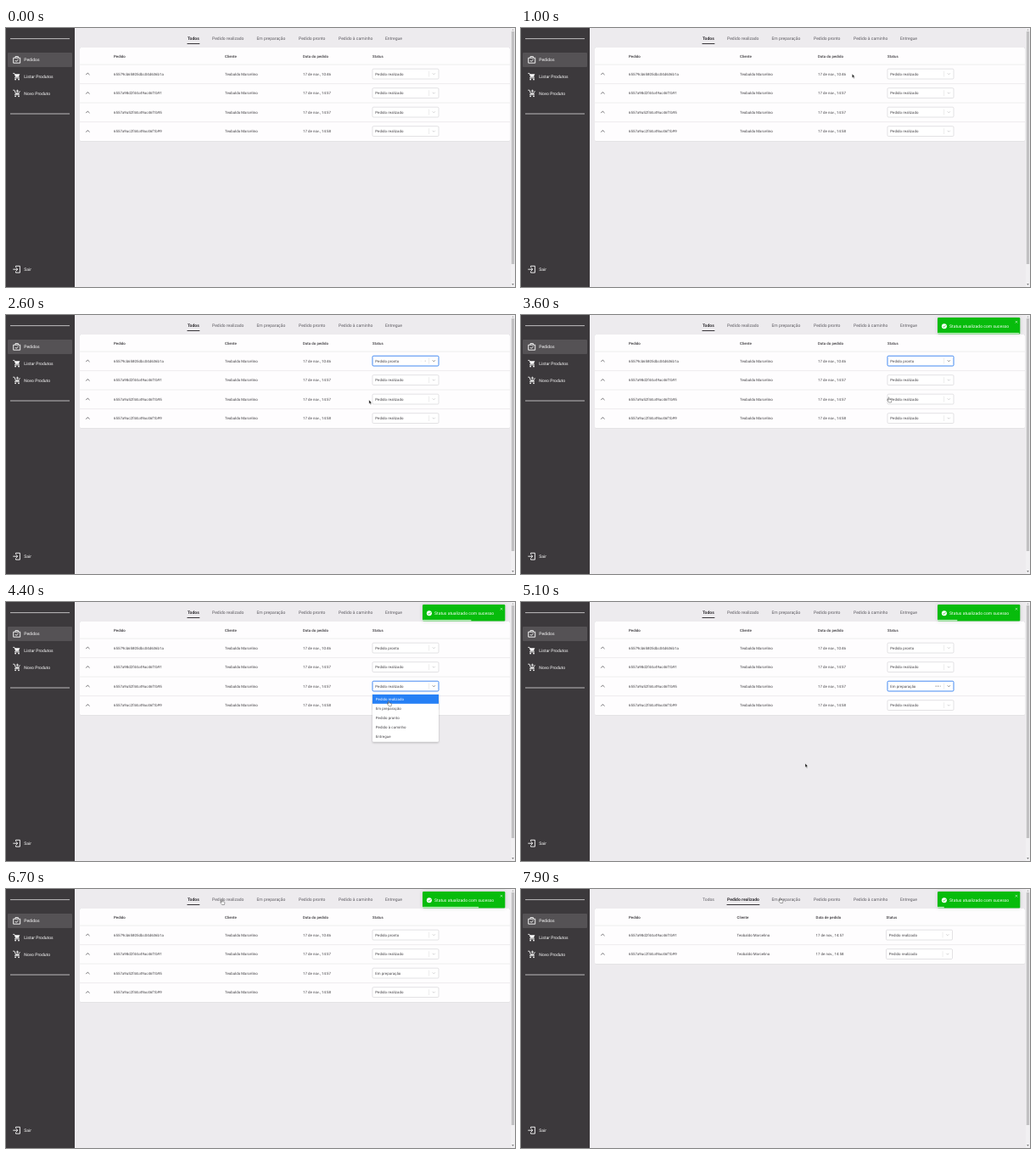
Write an HTML page that moves like this. It is 600x305 px and loops after 8 s.

```html
<!DOCTYPE html>
<html lang="pt">
<head>
<meta charset="utf-8">
<title>Pedidos</title>
<style>
html, body { margin: 0; width: 100%; height: 100%; overflow: hidden; background: #edebee; }
svg { display: block; width: 600px; height: 305px; font-family: Roboto, Arial, sans-serif; text-rendering: geometricPrecision; }
.card { filter: drop-shadow(0 .6px .6px rgba(0,0,0,.3)); }
.menu { filter: drop-shadow(0 1px 1.2px rgba(0,0,0,.25)); }
.toast { filter: drop-shadow(0 .5px 2px rgba(0,0,0,.15)); }
</style>
</head>
<body>
<svg viewBox="0 0 600 305">
  <rect width="600" height="305" fill="#edebee"/>
  <rect width="81" height="305" fill="#3c393c"/>
  <path d="M5 12.6H75M5 101H75" stroke="#f4f3f4" stroke-width=".7"/>
  <rect x="2" y="29" width="76" height="17" rx="1" fill="#555255"/>
  <g fill="none" stroke="#fff" stroke-width=".9" stroke-linejoin="round">
    <path d="M8.7 35.2H16.7V41.2H8.7ZM11 35V33.6H14.4V35M10.9 38.1L12.2 39.4L14.7 36.8"/>
    <path d="M11.5 281.8V280.3H16.4V288.1H11.5V286.6M8.3 284.2H13.6M11.9 282.3L13.8 284.2L11.9 286.1"/>
  </g>
  <g id="carts"></g>
  <g id="labels"></g>
  <rect x="595" width="5" height="305" fill="#f1f0f2"/>
  <rect x="595.8" y="4" width="3.4" height="274" fill="#c1c0c2"/>
  <path d="M596.2 301.2H598.8L597.5 302.7Z" fill="#555"/>
  <path d="M596.2 2.8H598.8L597.5 1.3Z" fill="#aaa"/>
  <g id="live"></g>
</svg>
<script>
const LOOP = 8000;
const STATUS = ["Pedido realizado", "Em preparação", "Pedido pronto", "Pedido à caminho", "Entregue"];
const TABS = [["Todos", 214, 228], ["Pedido realizado", 243, 281], ["Em preparação", 295.5, 329.5],
  ["Pedido pronto", 345, 377], ["Pedido à caminho", 392, 432], ["Entregue", 447, 467]];
const ORDERS = [
  ["65579cb65805dbc04d636b1a", "10:46"],
  ["6557a98d2f44c49ac46f1b91", "14:57"],
  ["6557a9a52f44c49ac46f1b95", "14:57"],
  ["6557a9ac2f44c49ac46f1b99", "14:58"]
];
const CLIENT = "Teobaldo Marcelino";

// time, x, y of the pointer tip
const PATH = [[100, 26, 232], [400, 150, 130], [600, 262, 13], [900, 358, 53], [1000, 390, 54],
  [1200, 452, 56], [1400, 452, 56], [1700, 452, 67], [2100, 451, 89], [2300, 451, 89],
  [2600, 428, 100], [2900, 392, 99], [3100, 392, 100], [3450, 433, 97], [3800, 433, 97],
  [4000, 440, 98], [4300, 450, 113], [4600, 452, 124], [4800, 452, 124], [4900, 410, 150],
  [5100, 335, 190], [5500, 318, 200], [5700, 312, 202], [5850, 288, 145], [6000, 239, 48.5],
  [6200, 217, 22], [6500, 254, 12.5], [7500, 254, 12.5], [7700, 268, 46], [7900, 305, 10.5], [8000, 305, 10.5]];

const OPEN = [[0, 1400, 2300], [2, 4000, 4800]];
const LOADING = [[0, 2300, 3000], [2, 4800, 5350]];
const TAB_AT = 6900, BLUR_AT = 6650;

const inside = (t, a, b) => t >= a && t < b;
const clamp = v => Math.max(0, Math.min(1, v));
const mix = (a, b, k) => a + (b - a) * k;
const easeOut = k => 1 - (1 - k) ** 3;

function text(str, x, mid, size = 4.375, fill = "#454347", weight = 400, space = .02) {
  return `<text x="${x}" y="${mid + size * .36}" font-size="${size}" font-weight="${weight}" fill="${fill}" letter-spacing="${space}">${str}</text>`;
}
function rect(x, y, w, h, fill, extra = "") {
  return `<rect x="${x}" y="${y}" width="${w}" height="${h}" fill="${fill}" ${extra}/>`;
}
function line(d, color, width = .5) {
  return `<path d="${d}" fill="none" stroke="${color}" stroke-width="${width}"/>`;
}

function cart(y, plus) {
  return `<g transform="translate(8 ${y})">` +
    line("M.3 .8H1.9L3.7 5.2H7.6", "#fff", .9) +
    (plus ? line("M5.4 .2V3.4M3.8 1.8H7M4 4.4H7L8.4 1.8", "#fff", .8) : `<path d="M2.3 1.6H8.4L6.9 4.7H3.6Z" fill="#fff"/>`) +
    line("M3.3 4.8L2.5 6.3H7.8", "#fff", .8) +
    `<circle cx="3.1" cy="7.9" r=".9" fill="#fff"/><circle cx="7" cy="7.9" r=".9" fill="#fff"/></g>`;
}

function tabs(active) {
  return TABS.map(([name, x, end], i) => i === active
    ? text(name, x, 12.5, 5, "#2f2d31", 700) + rect(x - .5, 18, end - x + .8, 1, "#39363a")
    : text(name, x, 12.5, 5, "#5c5a60")).join("");
}

function select(x, mid, value, focus, dots, t) {
  const ink = focus ? "#666" : "#c4c4c6";
  let out = rect(x, mid - 5.9, 78, 11.8, "#fff",
    `rx="1.2" stroke="${focus ? "#2f7df0" : "#c6c5c9"}" stroke-width="${focus ? .9 : .5}"`);
  out += text(STATUS[value], x + 3.3, mid, 4.375, "#454347", 400, .06);
  out += line(`M${x + 66.6} ${mid - 3.4}V${mid + 3.4}`, "#ccc", .35);
  out += line(`M${x + 70.8} ${mid - .8}L${x + 72.3} ${mid + .7}L${x + 73.8} ${mid - .8}`, ink, .75);
  if (dots) {
    for (let i = 0; i < 3; i++) {
      const a = .5 + .5 * Math.cos((t - i * 160) / 1000 * 2 * Math.PI);
      out += `<circle cx="${x + 57.2 + i * 2.5}" cy="${mid}" r=".65" fill="#666" opacity="${a}"/>`;
    }
  }
  return out;
}

function menu(x, mid, value, pointY) {
  const top = mid + 8.5, step = 10.94;
  let out = `<g class="menu">${rect(x, top, 78, 57.2, "#fff", 'rx="1.2"')}</g>`;
  const hover = Math.floor((pointY - top - 1.25) / step);
  STATUS.forEach((name, i) => {
    const y = top + 1.25 + i * step;
    if (i === value) out += rect(x, y, 78, step, "#2680f5");
    else if (i === hover) out += rect(x, y, 78, step, "#deebff");
    out += text(name, x + 3.8, y + step / 2, 4.375, i === value ? "#fff" : "#454347", 400, .06);
  });
  return out;
}

function table(t, pointY) {
  const filtered = t >= TAB_AT;
  const cols = filtered ? [127, 254.5, 347.5, 430.5] : [127, 258, 350, 432];
  const values = [t < 2300 ? 0 : 2, 0, t < 4800 ? 0 : 1, 0];
  const rows = filtered ? [1, 3] : [0, 1, 2, 3];
  const focus = t < 1300 || t >= BLUR_AT ? -1 : t < 4000 ? 0 : 2;
  let out = `<g class="card">${rect(87, 23, 507, 20.2 + rows.length * 22.5, "#fefdfe", 'rx="1.2"')}</g>`;
  ["Pedido", "Cliente", filtered ? "Data de pedido" : "Data do pedido", "Status"].forEach((h, i) => {
    out += text(h, cols[i], 33.7, 4.375, "#39373b", 500, .04);
  });
  rows.forEach((r, i) => {
    const mid = 54.1 + i * 22.5, [id, hour] = ORDERS[r];
    out += line(`M87 ${mid - 11}H594`, "#dcdadd", .5);
    out += line(`M94.3 ${mid + 1}L96.4 ${mid - 1.1}L98.5 ${mid + 1}`, "#454347", .75);
    out += text(id, cols[0], mid) + text(CLIENT, cols[1], mid) + text("17 de nov., " + hour, cols[2], mid);
    const busy = LOADING.some(([n, a, b]) => n === r && inside(t, a, b));
    out += select(cols[3], mid, values[r], focus === r, busy, t);
  });
  OPEN.forEach(([r, a, b]) => {
    if (inside(t, a, b)) out += menu(cols[3], 54.1 + r * 22.5, values[r], pointY);
  });
  return out;
}

// Bouncing entry from the right edge
function enter(k) {
  const stops = [[0, 940], [.6, -7.8], [.75, 3.1], [.9, -1.6], [1, 0]];
  for (let i = 1; i < stops.length; i++) {
    const [a, from] = stops[i - 1], [b, to] = stops[i];
    if (k < b) return mix(from, to, easeOut((k - a) / (b - a)));
  }
  return 0;
}

function toast(t, start, run, top) {
  const end = run + 2000, out = clamp((t - end) / 450);
  if (t < start || out >= 1) return "";
  let dx = enter(clamp((t - start) / (run - start)));
  if (out > 0) dx = out < .2 ? -6.2 * out / .2 : mix(-6.2, 620, ((out - .2) / .8) ** 2);
  const left = clamp((end - t) / 2000);
  return `<g transform="translate(${491 + dx} ${top})"><g class="toast">${rect(0, 0, 97.3, 19.4, "#07bc0c", 'rx="1.2"')}</g>` +
    rect(0, 17.9, 97.3 * left, 1.5, "#fff", 'opacity=".7"') +
    `<circle cx="7.9" cy="10.2" r="3" fill="#fff"/>` + line("M6.4 10.3L7.5 11.4L9.5 9.1", "#07bc0c", .75) +
    text("Status atualizado com sucesso", 14, 10.2, 5, "#fff") +
    line("M91.7 3.9L94.3 6.5M94.3 3.9L91.7 6.5", "#d5f5d6", .6) + "</g>";
}

function toasts(t) {
  const lift = clamp((t - 6050) / 280);
  return toast(t, 3000, 3580, 3) + toast(t, 5400, 6060, mix(27.6, 3, lift));
}

function pointAt(t) {
  const i = PATH.findIndex(p => p[0] > t);
  if (i < 1) return null;
  const [a, x, y] = PATH[i - 1], [b, u, v] = PATH[i], k = (t - a) / (b - a);
  return [mix(x, u, k), mix(y, v, k)];
}

function pointer(t, x, y) {
  const overTab = y > 7 && y < 19 && TABS.some(([, a, b]) => x >= a && x <= b);
  const overSelect = x > 431 && x < 510 && y > 47 && y < 167;
  const shape = overTab || overSelect
    ? ["M0 .4Q.6-.3 1 .4V2.2L3.4 2.7Q4 2.9 3.9 3.6L3.4 6H.7L-1.1 3.7Q-1-.0 0 3.5Z", "#fff", "#222"]
    : ["M0 0V4.6L1.1 3.7L1.9 5.5L2.7 5.1L1.9 3.4H3.3Z", "#111", "#fff"];
  return `<path transform="translate(${x} ${y})" d="${shape[0]}" fill="${shape[1]}" stroke="${shape[2]}" stroke-width=".4" stroke-linejoin="round"/>`;
}

const byId = id => document.getElementById(id);
byId("carts").innerHTML = cart(52.6, false) + cart(72.4, true);
byId("labels").innerHTML = [["Pedidos", 37.5], ["Listar Produtos", 57.2], ["Novo Produto", 76.8], ["Sair", 284.2]]
  .map(([s, y]) => text(s, 21.3, y, 5, "#fff")).join("");
const live = byId("live");

function draw(t) {
  const p = pointAt(t);
  live.innerHTML = tabs(t < TAB_AT ? 0 : 1) + table(t, p ? p[1] : 0) + toasts(t) + (p ? pointer(t, ...p) : "");
}
function tick() {
  draw(performance.now() % LOOP);
  requestAnimationFrame(tick);
}
tick();
</script>
</body>
</html>
```
